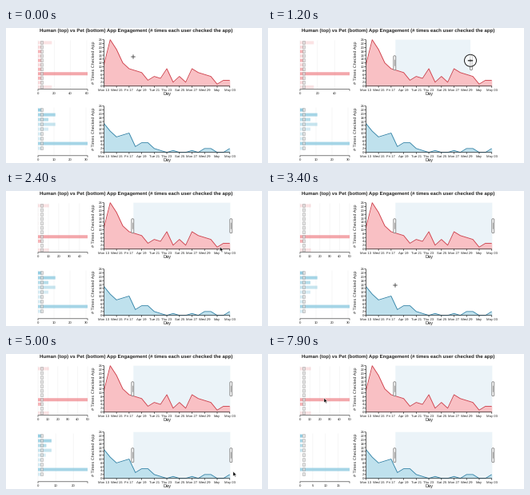
Recreate the animation shown at these times as a matplotlib script. Size 320 px wide and 169 px high, loop 8000 ms.

```python
import numpy as np
import matplotlib.pyplot as plt
from matplotlib.animation import FuncAnimation
from matplotlib.patches import Circle, Polygon, Rectangle, FancyBboxPatch

W, H, DPI = 320, 169, 100
FRAMES, STEP = 80, 100
PT = 72 / DPI  # points per pixel

plt.rcParams["font.family"] = "Liberation Sans"
plt.rcParams["text.hinting"] = "none"
plt.rcParams["path.snap"] = False

fig = plt.figure(figsize=(W / DPI, H / DPI), dpi=DPI, facecolor="white")
ax = fig.add_axes([0, 0, 1, 1])
ax.set_xlim(0, W)
ax.set_ylim(H, 0)
ax.axis("off")

# Layout
LEFT, RIGHT = 122.4, 279.7
BAR_X, BAR_W = 40, 62
BRUSH_LEFT, BRUSH_RIGHT = 159.3, 280.3
TOP_BASE, LOW_BASE = 72.7, 155.7
PLOT_H = 58
UNIT = PLOT_H / 24

DAYS = ["Mon 13", "Wed 15", "Fri 17", "Apr 19", "Tue 21", "Thu 23",
        "Sat 25", "Mon 27", "Wed 29", "May", "May 03"]
# Daily checks, the data being charted
HUMAN = [11, 24, 19, 12, 9, 8, 7, 3, 5, 4, 9, 2, 5, 2, 9, 7, 6, 5, 1, 3, 3]
PET = [15, 11, 8, 9, 10, 3, 5, 5, 2, 1, 0, 1, 0, 0, 1, 0, 2, 2, 0, 0, 2]

MAIN_ROW = 7  # the user whose bar fills the axis


def label(x, y, s, size=4.2, **kw):
    opts = dict(ha="center", va="center", color="#222222", zorder=6)
    opts.update(kw)
    return ax.text(x, y, s, fontsize=size * PT, **opts)


def line(xs, ys, color="#222222", width=.7, z=5):
    return ax.plot(xs, ys, color=color, lw=width * PT, zorder=z,
                   solid_capstyle="butt")[0]


def area_chart(values, base, fill, stroke):
    xs = np.linspace(LEFT, RIGHT, len(values))
    ys = base - np.array(values) * UNIT
    ax.fill_between(xs, ys, base, color=fill, lw=0, zorder=3)
    line(xs, ys, stroke, .9, 4)
    line([LEFT, LEFT], [base - PLOT_H, base])
    line([LEFT, RIGHT], [base, base])
    for v in range(0, 25, 2):
        y = base - v * UNIT
        line([LEFT - 2, LEFT], [y, y])
        label(LEFT - 2.3, y, str(v), ha="right", va="center_baseline")
    for x, day in zip(np.linspace(LEFT, RIGHT, len(DAYS)), DAYS):
        line([x, x], [base, base + 2])
        label(x, base + 5, day)
    label((LEFT + RIGHT) / 2, base + 9.5, "Day", 5.6)
    label(110, base - PLOT_H / 2, "# Times Checked App", 5.5, rotation=90)


def human_row(i):
    """Share of the axis before and after brushing, and opacity."""
    if i == MAIN_ROW:
        return 1, 1, .7
    if i in (0, 10):
        return .28, .22, .22
    return .08, .07 * (i == MAIN_ROW + 1), .3 + .3 * (i % 2 == 0)


def pet_row(i):
    if i == MAIN_ROW:
        return 1, 1, .8
    wide = .28 - .07 * (-1) ** i
    return (wide if 1 <= i <= 4 else .08), .05 * (i < 4), .95 - .15 * min(i, 4)


class BarChart:
    """Horizontal bars with blurred row names and a rescaling axis."""

    def __init__(self, first, gap, count, row, color, base):
        rows = [row(i) for i in range(count)]
        self.before, self.after, alphas = np.array(rows).T
        self.bars = []
        for i, alpha in enumerate(alphas):
            y = first + i * gap
            bar = Rectangle((BAR_X, y - 2), 0, 4, fc=color, alpha=alpha,
                            lw=0, zorder=3)
            self.bars.append(ax.add_patch(bar))
            ax.add_patch(Rectangle((43.5, y - 1.9), 3, 3.8, fc="#dddddd",
                                   ec="#999999", lw=.7 * PT, alpha=.7,
                                   zorder=4))
        line([BAR_X, BAR_X, BAR_X + BAR_W, BAR_X + BAR_W],
             [base + 2, base, base, base + 2], "#444444")
        self.grid = [line([0, 0], [first - 3, base], "#f3f3f3", .7, 1)
                     for _ in range(6)]
        self.ticks = [label(0, base + 5, "") for _ in range(6)]

    def update(self, limit, progress):
        shares = mix(self.before, self.after, progress)
        for bar, share in zip(self.bars, shares):
            bar.set_width(share * BAR_W)
        step = 5 if limit < 20.5 else 10 if limit < 55 else 20
        for i, (g, t) in enumerate(zip(self.grid, self.ticks)):
            x = BAR_X + i * step / limit * BAR_W
            shown = i * step <= limit
            g.set_xdata([x, x])
            g.set_visible(shown)
            t.set_x(x)
            t.set_text(str(i * step) if shown else "")


class Brush:
    """Selected day range with a grip on each side."""

    def __init__(self, base):
        self.y = base - PLOT_H
        self.rect = ax.add_patch(Rectangle((BRUSH_LEFT, self.y), 0, PLOT_H,
                                           fc="#ebf3f8", lw=0, zorder=2))
        self.grips = [self.grip(), self.grip()]

    def grip(self):
        box = FancyBboxPatch((0, 0), 3, 18, lw=.8 * PT, fc="#f2f2f2",
                             ec="#808080", zorder=7,
                             boxstyle="round,pad=0,rounding_size=1.4")
        ax.add_patch(box)
        return box, line([0, 0], [self.y + 25, self.y + 33], "#808080", .7, 8)

    def update(self, end):
        end = np.clip(end, BRUSH_LEFT, BRUSH_RIGHT)
        shown = end > BRUSH_LEFT + .5
        self.rect.set_width(end - BRUSH_LEFT)
        self.rect.set_visible(shown)
        for (box, mark), x in zip(self.grips, (BRUSH_LEFT - 1, end + 1)):
            box.set_bounds(x - 1.5, self.y + 20, 3, 18)
            mark.set_xdata([x, x])
            box.set_visible(shown)
            mark.set_visible(shown)


class Cursor:
    ARROW = np.array([(0, 0), (0, 6), (1.4, 4.8), (2.4, 7), (3.4, 6.5),
                      (2.5, 4.5), (4.3, 4.4)])

    def __init__(self):
        self.ring = ax.add_patch(Circle((0, 0), 7.5, fc=(1, 1, 1, .6),
                                        ec="#222222", lw=1 * PT, zorder=10))
        self.h = line([0, 0], [0, 0], "#444444", .9, 11)
        self.v = line([0, 0], [0, 0], "#444444", .9, 11)
        self.arrow = ax.add_patch(Polygon(self.ARROW, fc="black", ec="white",
                                          lw=.5 * PT, zorder=11))

    def update(self, x, y, kind):
        wide = kind == "resize"
        across, up = (3.2, 1.4) if wide else (2.7, 2.7)
        self.ring.center = (x, y)
        self.h.set_data([x - across, x + across], [y, y])
        self.h.set_linewidth((1.5 if wide else .9) * PT)
        self.v.set_data([x, x], [y - up, y + up])
        self.ring.set_visible(kind in ("drag", "resize"))
        self.h.set_visible(kind in ("cross", "drag", "resize"))
        self.v.set_visible(kind in ("cross", "drag", "resize", "beam"))
        self.arrow.set_xy(self.ARROW + (x, y))
        self.arrow.set_visible(kind == "arrow")


def mix(a, b, u):
    return a + (b - a) * u


def ease(t, start, end):
    u = np.clip((t - start) / (end - start), 0, 1)
    return u * u * (3 - 2 * u)


# Cursor stops: time, x, y
PATH = [(200, 159, 36), (900, 222, 36.5), (1500, 284, 45), (1800, 289, 48),
        (2200, 289, 60), (3400, 159, 118), (3800, 159, 118),
        (4300, 268, 132), (4700, 289, 138), (5700, 272, 168),
        (7200, 115, 160), (7800, 70, 55)]

# Cursor shape from each time onward
KINDS = [(0, "cross"), (200, "resize"), (1500, "beam"), (2000, "arrow"),
         (2700, "cross"), (3900, "drag"), (4700, "beam"), (5000, "arrow"),
         (5800, None), (7300, "arrow")]


def cursor_at(t):
    times, xs, ys = zip(*PATH)
    return np.interp(t, times, xs), np.interp(t, times, ys)


label(163, 3.4, "Human (top) vs Pet (bottom) App Engagement "
      "(# times each user checked the app)", 6.1, weight="bold")
area_chart(HUMAN, TOP_BASE, "#f9c0c4", "#cf3f4a")
area_chart(PET, LOW_BASE, "#bfe1ed", "#3484a8")
human_bars = BarChart(18.4, 5.55, 11, human_row, "#ef8288", 76.7)
pet_bars = BarChart(102.6, 6, 9, pet_row, "#8fcbe0", 159.8)
top_brush, low_brush = Brush(TOP_BASE), Brush(LOW_BASE)
cursor = Cursor()


def draw(i):
    t = i * STEP
    dip = mix(61, 21, ease(t, 1100, 1600))
    human_bars.update(mix(dip, 50, ease(t, 1900, 2500)), ease(t, 1100, 2500))
    settled = ease(t, 4800, 5400)
    pet_bars.update(mix(31, 19.5, settled), settled)
    # Brush edges follow the cursor while it drags, the lower one lagging
    top_brush.update(cursor_at(min(t, 1600))[0])
    low_brush.update(cursor_at(np.clip(t, 3800, 4700))[0] - 6)
    kind = [k for start, k in KINDS if start <= t][-1]
    cursor.update(*cursor_at(t), kind)
    return []


anim = FuncAnimation(fig, draw, frames=FRAMES, interval=STEP,
                     init_func=lambda: draw(0), repeat=True, repeat_delay=0,
                     blit=False)
plt.show()
```
